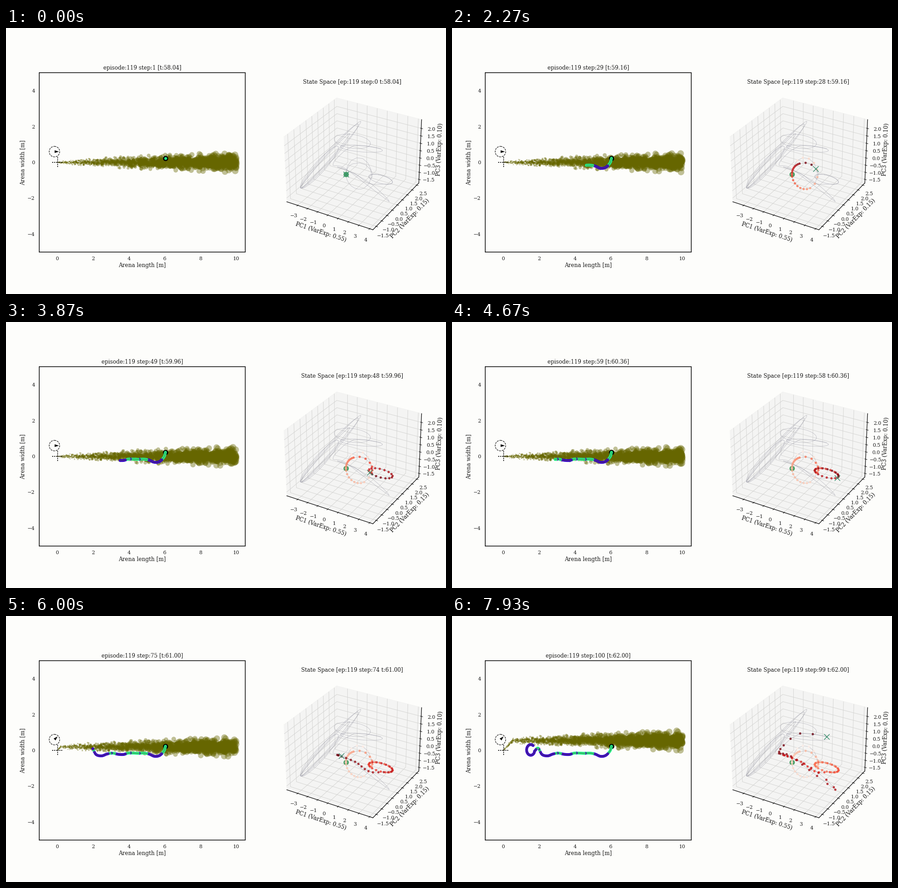
A matplotlib script for the animation above (8 s loop, 963 px wide and 582 px high).

```python
import numpy as np
import matplotlib.pyplot as plt
from matplotlib.animation import FuncAnimation
from matplotlib.patches import Circle, Polygon, Rectangle

W, H, DPI = 963, 582, 96
STEPS, FRAMES, LOOP = 100, 121, 8000
PX = 72 / DPI                      # points per pixel
INK = "#1c1c1c"
UNIT, X0, Y0 = 39.2, 112, 294      # pixels per metre, arena origin
WIND, TURN = 0.02, 61              # metres per step, step at which it veers

plt.rcParams.update({
    "font.family": "DejaVu Serif", "text.color": INK, "axes.labelcolor": INK,
    "xtick.color": INK, "ytick.color": INK, "axes.edgecolor": "black",
    "grid.color": "#d4d4d2", "grid.linewidth": 0.7, "axes.linewidth": 0.9,
})

fig = plt.figure(figsize=(W / DPI, H / DPI), dpi=DPI, facecolor="#fdfdfb")


def curve(knots, t):
    """Smooth path through (time, x, y) knots."""
    k = np.array(knots, float)
    s, p = k[:, 0], k[:, 1:]
    m = np.gradient(p, s, axis=0)
    i = np.clip(np.searchsorted(s, t, side="right") - 1, 0, len(s) - 2)
    h = (s[i + 1] - s[i])[:, None]
    u = (t - s[i])[:, None] / h
    return ((2 * u**3 - 3 * u**2 + 1) * p[i] + (u**3 - 2 * u**2 + u) * h * m[i]
            + (3 * u**2 - 2 * u**3) * p[i + 1] + (u**3 - u**2) * h * m[i + 1])


def orbit(angle, cx, cy, rx, ry, tilt=0):
    """Points on a tilted ellipse; angles in degrees, clockwise."""
    a, b = np.radians(angle), np.radians(tilt)
    u, v = rx * np.cos(a), ry * np.sin(a)
    return np.c_[cx + u * np.cos(b) - v * np.sin(b),
                 cy + u * np.sin(b) + v * np.cos(b)]


def area(r):
    """Marker area for a radius in pixels."""
    return (2 * PX * r) ** 2


def drift(s):
    """Wind displacement since step 0, in metres."""
    late = np.maximum(0, s - TURN) * WIND / np.sqrt(2)
    return WIND * np.minimum(s, TURN) + late, late


# State space box
SIDE = 349.7
box = fig.add_axes([582 / W, (H - 470.2) / H, SIDE / W, SIDE / H],
                   projection="3d", facecolor="none")
box.set_box_aspect((4, 4, 3), zoom=24 / 25)
box.set(xlim=(-4.118, 4.306), ylim=(-1.805, 2.722), zlim=(-1.756, 2.577),
        xticks=np.arange(-3, 5), yticks=np.arange(-1.5, 2.6, 0.5),
        zticks=np.arange(-1.5, 2.1, 0.5))
shares = (0.55, 0.15, 0.10)
for i, (axis, share) in enumerate(zip((box.xaxis, box.yaxis, box.zaxis), shares)):
    axis.set_label_text(f"PC{i + 1} (VarExp: {share:.2f})", fontsize=12 * PX)
    axis.labelpad = -0.6
    axis.set_tick_params(labelsize=11 * PX, pad=2.5)
    axis.set_pane_color((0.95, 0.95, 0.945, 0.8))

# Pixel canvas over the whole stage
ax = fig.add_axes([0, 0, 1, 1], facecolor="none", zorder=5)
ax.set(xlim=(0, W), ylim=(H, 0))
ax.axis("off")


def label(x, y, text, size=11, ha="center"):
    return ax.text(x, y, text, fontsize=size * PX, ha=ha, va="baseline")


for v in range(0, 11, 2):
    label(X0 + UNIT * v, 508, str(v))
for v in range(-4, 5, 2):
    label(63.5, Y0 - UNIT * v + 4, str(v).replace("-", "\u2212"), ha="right")
label(298, 523, "Arena length [m]", 12)
ax.text(36.5, 294, "Arena width [m]", fontsize=12 * PX, rotation=90,
        ha="center", va="center")
title = label(298, 91.5, "", 12)
state_title = label(757.5, 122, "", 12)

# Arena furniture
ax.add_patch(Rectangle((72.7, 97.7), 450.9, 392.6, fill=False, ec="black",
                       lw=1.5 * PX, zorder=4, snap=False))
ax.add_patch(Circle((106, 270.5), 11.5, fill=False, ec="black", lw=1.1 * PX,
                    ls=(0, (3.7, 1.6)), zorder=4))
dots = dict(color="black", lw=1.9 * PX, ls=(0, (1, 1.1)), zorder=4)
ax.plot([100.5, 125], [294.3, 294.3], **dots)
ax.plot([112.5, 112.5], [282, 306], **dots)
arrow = ax.add_patch(Polygon([(0, 0)] * 3, fc="black", ec="none", zorder=4))


def draw_arrow(angle):
    c, s = np.cos(angle), np.sin(angle)
    pts = np.array([(0.5, 2.9), (9.8, 0), (0.5, -2.9)])
    arrow.set_xy(np.c_[106 + pts @ (c, s), 270.5 + pts @ (-s, c)])


# Odour plume: puffs leave the origin, drift with the wind, spread and grow
rng = np.random.default_rng(7)
birth = np.sort(rng.uniform(-520, STEPS, 2000))
spread = np.clip(rng.normal(0, 1, birth.size), -2.7, 2.7)
puffs = ax.scatter([], [], c="#666600", alpha=0.4, linewidths=0, zorder=1)


def draw_plume(step):
    b = birth[birth < step]
    (sx, sy), (bx, by) = drift(step), drift(b)
    dist = WIND * (step - b)
    x, y = sx - bx, sy - by + 0.063 * np.sqrt(dist) * spread[:b.size]
    keep = x < 10
    puffs.set_offsets(np.c_[X0 + UNIT * x, Y0 - UNIT * y][keep])
    puffs.set_sizes(area(0.7 + 0.66 * dist[keep]))


# Agent track: a key point every five steps, then one turn of casting
steps = np.arange(1, STEPS + 1)
WAYPOINTS = [(349, 285), (346, 295), (336.5, 305), (325, 307), (313, 302),
             (301, 300), (289.5, 300.5), (279, 300), (267.5, 300), (257, 303),
             (245, 302.5), (233, 300), (221, 302), (209.5, 306), (197, 303),
             (188.5, 289), (180.5, 296)]
knots = [(1 + 5 * i, x, y) for i, (x, y) in enumerate(WAYPOINTS)]
cast = np.interp(steps[81:], [81, STEPS], [15, 305])
track = np.vstack([curve(knots, steps[:81]), orbit(cast, 172.3, 293, 9, 11.7)])

# The agent smells above the plume's lower edge, with gaps close to that edge
depth = 301.2 - UNIT * drift(steps)[1] - track[:, 1]
smelling = (depth > 0) & ~((depth < 4) & (steps % 9 == 3))
track_rgb = np.where(smelling, "#20f488", "#3300cc")
ax.add_patch(Circle((349.3, 285.5), 5.7, fc="black", ec="none", zorder=2))
trail = ax.scatter([], [], s=area(3.1), linewidths=0, zorder=3)
core, = ax.plot([], [], color="#6a5636", alpha=0.6, lw=1.5 * PX, zorder=3.5)

# Neural state: a wide loop, two flat loops, then long swings
wide, flat = np.arange(29), np.arange(32, 61)
turn = np.interp(wide, [0, 9, 16, 25, 28], [180, 425, 530, 606, 690])
SWINGS = [(62, 803, 342), (67, 764, 319), (72, 725, 304), (76, 755, 315),
          (79, 802, 343), (82, 839, 380), (84, 799, 350), (88, 742, 307),
          (93, 716, 297), (95, 726, 283), (97, 762, 257), (99, 820, 264)]
state = curve(np.vstack([
    np.c_[wide, orbit(turn, 772, 320, 28, np.linspace(38, 24, wide.size))],
    np.c_[flat, orbit(180 + 23 * (flat - 33.5), 820, 331, 27, 9, 15)],
    SWINGS]), np.arange(STEPS))

# Faint background orbits: slim loops from one corner, and two return loops
thin = dict(color="#808090", alpha=0.5, lw=0.7 * PX, zorder=1)
ax.plot(*state.T, **thin)
lap = np.linspace(0, 360, 90)
for r, w in ((98, 7), (94, 10), (80, 5), (61, 12)):
    ax.plot(*orbit(lap, 645 + 0.67 * r, 350 - 0.742 * r, r, w, -48).T, **thin)
ax.plot(*orbit(lap, 778, 264, 46, 7, 5).T, **thin)
ax.plot(*orbit(lap, 758, 248, 40, 15, 8).T, **thin)

ax.scatter(*state[0], s=area(5.8), c="#46a066", linewidths=0, zorder=2)
visited = ax.scatter([], [], s=area(2.5), linewidths=0, alpha=0.8, zorder=3)
cross, = ax.plot([], [], "x", color="#3c9070", ms=11.5 * PX, mew=1.4 * PX, zorder=3)


def update(n):
    step = max(1, int(np.ceil(STEPS * n / (FRAMES - 1))))
    seen = step - 1
    clock = f"t:{58 + 0.04 * step:.2f}"
    title.set_text(f"episode:119 step:{step} [{clock}]")
    state_title.set_text(f"State Space [ep:119 step:{seen} {clock}]")

    draw_plume(step)
    draw_arrow(np.pi / 4 if step > TURN else 0)
    trail.set_offsets(track[:step])
    trail.set_facecolor(list(track_rgb[:step]))
    core.set_data(*track[:step].T)

    visited.set_offsets(state[:seen])
    visited.set_facecolor(plt.cm.Reds(np.linspace(0, 1, seen)))
    cross.set_data(*state[seen:step].T)
    return ()


anim = FuncAnimation(fig, update, frames=FRAMES, init_func=lambda: update(0),
                     interval=LOOP / FRAMES, repeat=True, repeat_delay=0)
plt.show()
```
